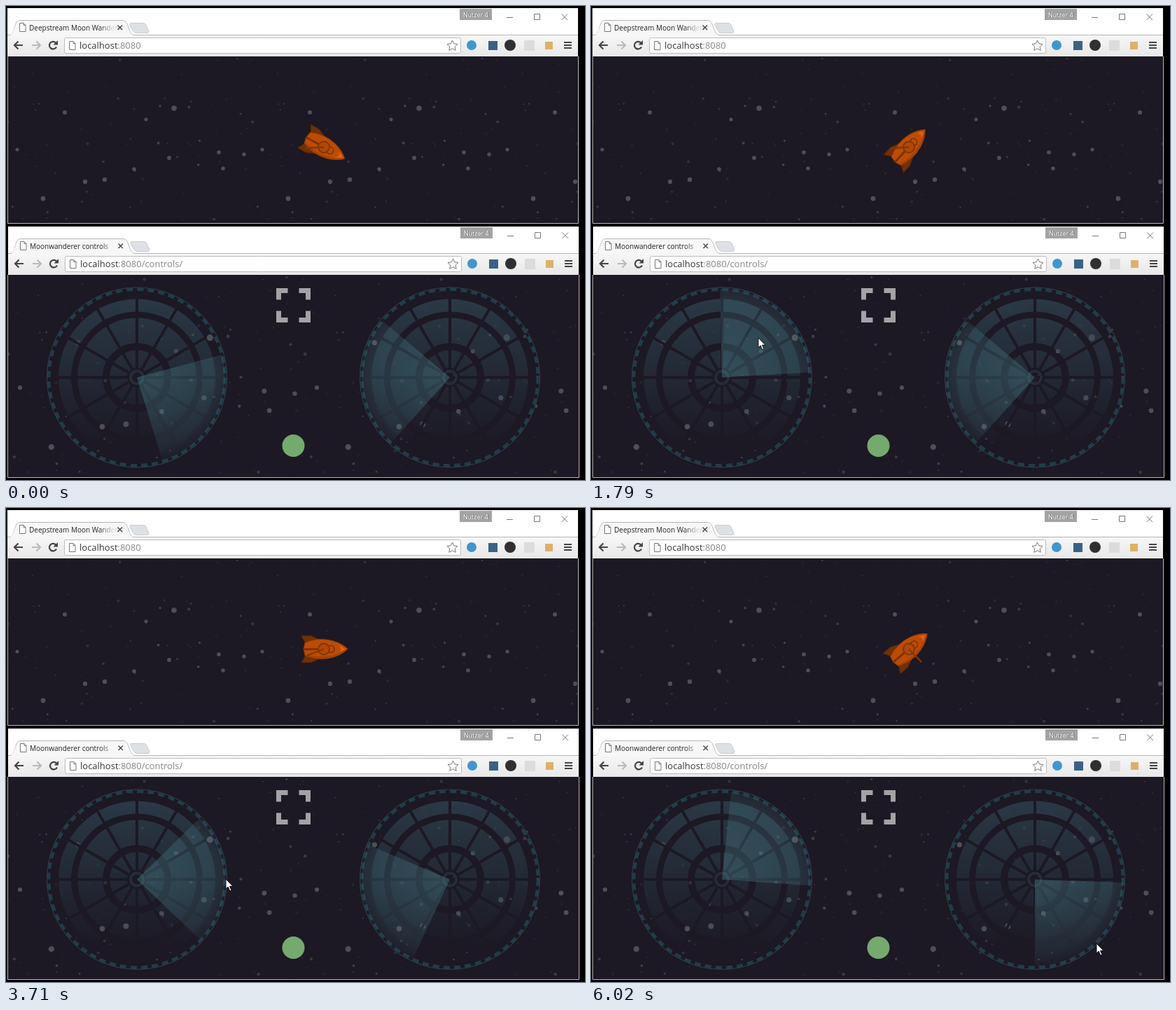
Animation of 827x677 px, one loop 6800 ms. Source, as an HTML page with a canvas:

```html
<!DOCTYPE html>
<html lang="en">
<head>
<meta charset="utf-8">
<title>Ship and controls</title>
<style>
html, body { margin: 0; width: 100%; height: 100%; overflow: hidden; background: #000; }
canvas { display: block; }
</style>
</head>
<body>
<canvas id="stage" width="827" height="677"></canvas>
<script>
const W = 827, H = 677, LOOP = 6800, STEP = 77, TAU = Math.PI * 2, RAD = Math.PI / 180;
const SPACE = '#1c1824';
const LEFT = [187, 530.5], RIGHT = [634, 530.5], SHIP = [454, 201.5];
const stage = document.getElementById('stage').getContext('2d');
const backdrop = document.createElement('canvas');
backdrop.width = W;
backdrop.height = H;
let g = backdrop.getContext('2d');

// Drawing helpers, all working on the current context g
function rect(x, y, w, h, color) {
  g.fillStyle = color;
  g.fillRect(x, y, w, h);
}
function disc(x, y, r, color) {
  g.fillStyle = color;
  g.beginPath();
  g.arc(x, y, r, 0, TAU);
  g.fill();
}
function ring(x, y, r, width, color) {
  g.strokeStyle = color;
  g.lineWidth = width;
  g.beginPath();
  g.arc(x, y, r, 0, TAU);
  g.stroke();
}
function path(d, fill, stroke, width = 1) {
  const p = new Path2D(d);
  if (fill) { g.fillStyle = fill; g.fill(p); }
  if (stroke) { g.strokeStyle = stroke; g.lineWidth = width; g.stroke(p); }
}
function text(s, x, y, size, color) {
  g.font = size + 'px "Open Sans", "Noto Sans", sans-serif';
  g.fillStyle = color;
  g.fillText(s, x, y);
  return x + g.measureText(s).width;
}
function fade(x0, y0, x1, y1, ...colors) {
  const f = g.createLinearGradient(x0, y0, x1, y1);
  colors.forEach((c, i) => f.addColorStop(i / (colors.length - 1), c));
  return f;
}
function placed(x, y, paint) {
  g.save();
  g.translate(x, y);
  paint();
  g.restore();
}

function browser(title, url) {
  const pageIcon = () => path('M0.5 0.5H6L9 3.5V12.5H0.5ZM6 0.5V3.5H9', '#fff', '#777');
  rect(2, 3, 815, 38, '#fff');
  rect(2, 41, 815, 31, fade(0, 41, 0, 71, '#f7f7f7', '#e8e8e8'));
  path('M2 41.5H5C9 41 10 37 12 31S15 20.5 20 20.5H166C171 20.5 173 25 175 31S179 41 183 41.5H817', null, '#b4b4b4');
  path('M6 42C11 40 13 21 20 21H166C173 21 175 40 182 42Z', '#f7f7f7');
  path('M179 24.5H196Q199 24.5 200 27L204 36Q204 38.5 201 38.5H186Q183 38.5 181 35L177 27Q176 24.5 179 24.5Z', '#dde0e5', '#c9ccd2');
  placed(19, 24, pageIcon);
  text(title, 33, 34.5, 10, fade(134, 0, 152, 0, '#222', 'rgba(34,34,34,.15)'));
  path('M159.5 27.5L166 34M166 27.5L159.5 34', null, '#444', 1.4);

  rect(648, 4, 46, 16, '#a3a3a3');
  text('Nutzer 4', 654, 16, 9, '#666');
  text('Nutzer 4', 653, 15.5, 9, '#fff');
  path('M715 16.5H724M754.5 11.5H762.5V19.5H754.5ZM793.5 11.5L802 20M802 11.5L793.5 20', null, '#777');

  path('M24 56H12.5M17.5 50.5L12 56L17.5 61.5', null, '#444', 2.2);
  path('M37 56H48.5M43.5 50.5L49 56L43.5 61.5', null, '#bbb', 2.2);
  path('M71.5 53A5.3 5.3 0 1 0 72 58.5', null, '#444', 2.2);
  path('M74 49V55.5H67.5Z', '#444');
  g.beginPath();
  g.roundRect(83.5, 45.5, 566, 22, 2);
  g.fillStyle = '#fff';
  g.fill();
  g.strokeStyle = '#bcbcbc';
  g.lineWidth = 1;
  g.stroke();
  placed(90, 50, pageIcon);
  text(url, text('localhost', 105, 61, 13, '#333'), 61, 13, '#858585');
  path('M637.5 49L639.8 53.8L645 54.5L641.2 58.1L642.2 63.3L637.5 60.8L632.8 63.3L633.8 58.1L630 54.5L635.2 53.8Z', '#fff', '#777');
  disc(665, 56, 7, '#4196cd');
  rect(689, 50, 13, 13, '#3a6285');
  disc(720, 56, 8, '#303030');
  rect(740, 49, 15, 15, '#dcdcdc');
  rect(770, 51, 11, 11, '#dfb06a');
  for (let y = 51; y < 62; y += 4) rect(797, y, 11, 2, '#444');
}

// The sky repeats one tile: a few landmark stars among seeded dust
const TILE = 350;
const LANDMARKS = [[238, 74], [51, 203], [139, 176], [111, 179], [82, 80], [231, 145],
  [302, 137], [308, 160], [181, 161], [338, 140], [14, 133], [198, 90]];
function sky(ox, oy, w, h, scale) {
  let seed = 41;
  const rnd = () => (seed = seed * 16807 % 2147483647) / 2147483647;
  const stars = LANDMARKS.map(([x, y], i) => [x, y, 3.8 - Math.sqrt(i) * 0.38, 0.36]);
  for (let i = 0; i < 150; i++)
    stars.push([rnd() * TILE, rnd() * 238, 0.5 + 1.6 * rnd() ** 2, 0.04 + 0.26 * rnd() ** 2]);
  g.save();
  g.beginPath();
  g.rect(ox, oy, w, h);
  g.clip();
  rect(ox, oy, w, h, SPACE);
  g.translate(ox, oy);
  g.scale(scale, scale);
  for (let x = 0; x < w / scale; x += TILE)
    for (const [sx, sy, r, alpha] of stars)
      disc(x + sx, sy, r, `rgba(175,175,172,${alpha})`);
  g.restore();
}

function wheel([x, y]) {
  const panel = fade(0, y - 115, 0, y + 105, 'rgba(54,82,96,.57)', 'rgba(45,68,81,.4)', 'rgba(40,60,73,0)');
  for (const [inner, outer] of [[14, 39], [49, 85], [94, 112]])
    ring(x, y, (inner + outer) / 2, outer - inner, panel);
  placed(x, y, () => {
    for (let i = 0; i < 12; i++) {
      rect(13, -2, 100, 4, SPACE);
      g.rotate(TAU / 12);
    }
  });
  ring(x, y, 9, 4, '#232d39');
  ring(x, y, 128.5, 1, '#36414e');
  const dash = TAU * 126 / 52;
  g.setLineDash([dash * 0.6, dash * 0.4]);
  ring(x, y, 126, 5, '#213c49');
  g.setLineDash([]);
}

function drawBackdrop() {
  rect(0, 0, W, H, '#000');
  browser('Deepstream Moon Wanderer', ':8080');
  placed(1, 312, () => browser('Moonwanderer controls', ':8080/controls/'));
  sky(2, 72, 815, 238, 1);
  sky(3, 384, 815, 290, 424 / TILE);
  path('M2.5 72V310.5H817.5V72M2.5 384V673.5H818.5V384', null, '#b9b9bb');
  wheel(LEFT);
  wheel(RIGHT);
  for (let i = 0; i < 4; i++)
    placed(410.5, 427.5, () => {
      g.rotate(i * TAU / 4);
      path('M8 24.5H24.5V8H17.5V17.5H8Z', '#a3a3a5');
    });
  disc(410.5, 628, 16, '#75aa6e');
}

// Turning points of both dials: [time, degrees], steady sweeps in between
const HULL = [[119, 29], [120, 67], [470, 68], [1090, 194], [1390, 248], [1560, 248],
  [1780, 313], [2020, 410], [3560, 411], [4250, 165], [4640, 320]];
const GUN = [[2320, 176], [2472, 162], [2880, 315], [3100, 315], [3480, 159],
  [4780, 159], [4936, 386], [5400, 560], [6014, 406]];
// The pointer visits the dials in turn
const VISITS = [
  { from: 120, to: 2020, center: LEFT, dial: HULL },
  { from: 2320, to: 3560, center: RIGHT, dial: GUN },
  { from: 3704, to: 4640, center: LEFT, dial: HULL },
  { from: 4850, to: 6014, center: RIGHT, dial: GUN }
];

const mix = (a, b, k) => a + (b - a) * k;
function at(track, t) {
  const i = track.findIndex(key => key[0] > t);
  if (i === 0) return track[0][1];
  if (i < 0) return track[track.length - 1][1];
  const [t0, a] = track[i - 1], [t1, b] = track[i];
  return mix(a, b, (t - t0) / (t1 - t0));
}
// Steers from inside the dial, entering and leaving over its rim
function steer({ from, to, center, dial }, t) {
  const rim = Math.max(0, 1 - Math.min(t - from, to - t) / 150);
  const r = 77 + 50 * rim, a = at(dial, t) * RAD;
  return [center[0] + r * Math.cos(a), center[1] + r * Math.sin(a)];
}
function pointer(t) {
  const i = VISITS.findIndex(v => t <= v.to);
  const visit = VISITS[i], last = VISITS[i - 1];
  if (!visit) return null;
  if (t >= visit.from) return steer(visit, t);
  if (!last) return null;
  const a = steer(last, last.to), b = steer(visit, visit.from);
  const k = (t - last.to) / (visit.from - last.to);
  return [mix(a[0], b[0], k), mix(a[1], b[1], k)];
}

function wedge([x, y], angle) {
  const glow = g.createRadialGradient(x, y, 0, x, y, 126);
  glow.addColorStop(0, 'rgba(90,160,168,.22)');
  glow.addColorStop(0.85, 'rgba(75,140,150,.09)');
  glow.addColorStop(1, 'rgba(70,130,140,0)');
  const wash = fade(0, y - 130, 0, y + 128, 'rgba(75,140,150,.12)', 'rgba(75,140,150,.17)', 'rgba(75,140,150,.02)');
  g.beginPath();
  g.moveTo(x, y);
  g.arc(x, y, 126, (angle - 44) * RAD, (angle + 44) * RAD);
  g.closePath();
  for (const f of [wash, glow]) {
    g.fillStyle = f;
    g.fill();
  }
}

function ship(hull, gun) {
  placed(...SHIP, () => {
    g.rotate(hull * RAD);
    path('M-32 -19H-18L-3 -12L-24 -5ZM-32 19H-18L-3 12L-24 5Z', '#713006', '#5a2706');
    path('M-27 -9Q-8 -17 12 -12Q26 -8 34 0Q26 8 12 12Q-8 17 -27 9L-29 0Z', '#bd4c02', '#8c3905');
    path('M-26 7Q-8 13 12 9Q26 5 33 0Q26 8 12 12Q-8 16 -26 9Z', '#a54304');
    path('M-29 0H-8', null, '#7b3304', 3);
    path('M22 -5L31 0L22 5L25 0Z', '#e2630d');
    ring(10, 0, 5, 2, '#863704');
  });
  placed(...SHIP, () => {
    disc(0, 0, 8, '#b24803');
    ring(0, 0, 8, 2, '#803504');
    g.rotate(gun * RAD);
    path('M0 0H26', null, '#823604', 2.4);
  });
}

function draw(now) {
  const t = Math.floor((now % LOOP - 8) / STEP) * STEP + 8;
  const hull = at(HULL, t), gun = at(GUN, t), hand = pointer(t);
  g.drawImage(backdrop, 0, 0);
  wedge(LEFT, hull);
  wedge(RIGHT, gun);
  ship(hull, gun);
  if (hand)
    placed(...hand.map(Math.round), () =>
      path('M0 0V14L3.2 11L5.8 17L8 16L5.5 10.3H10Z', t < 1160 ? '#2fc63c' : '#fff', '#111'));
}

function loop(now) {
  draw(now);
  requestAnimationFrame(loop);
}
drawBackdrop();
g = stage;
draw(0);
requestAnimationFrame(loop);
</script>
</body>
</html>
```
